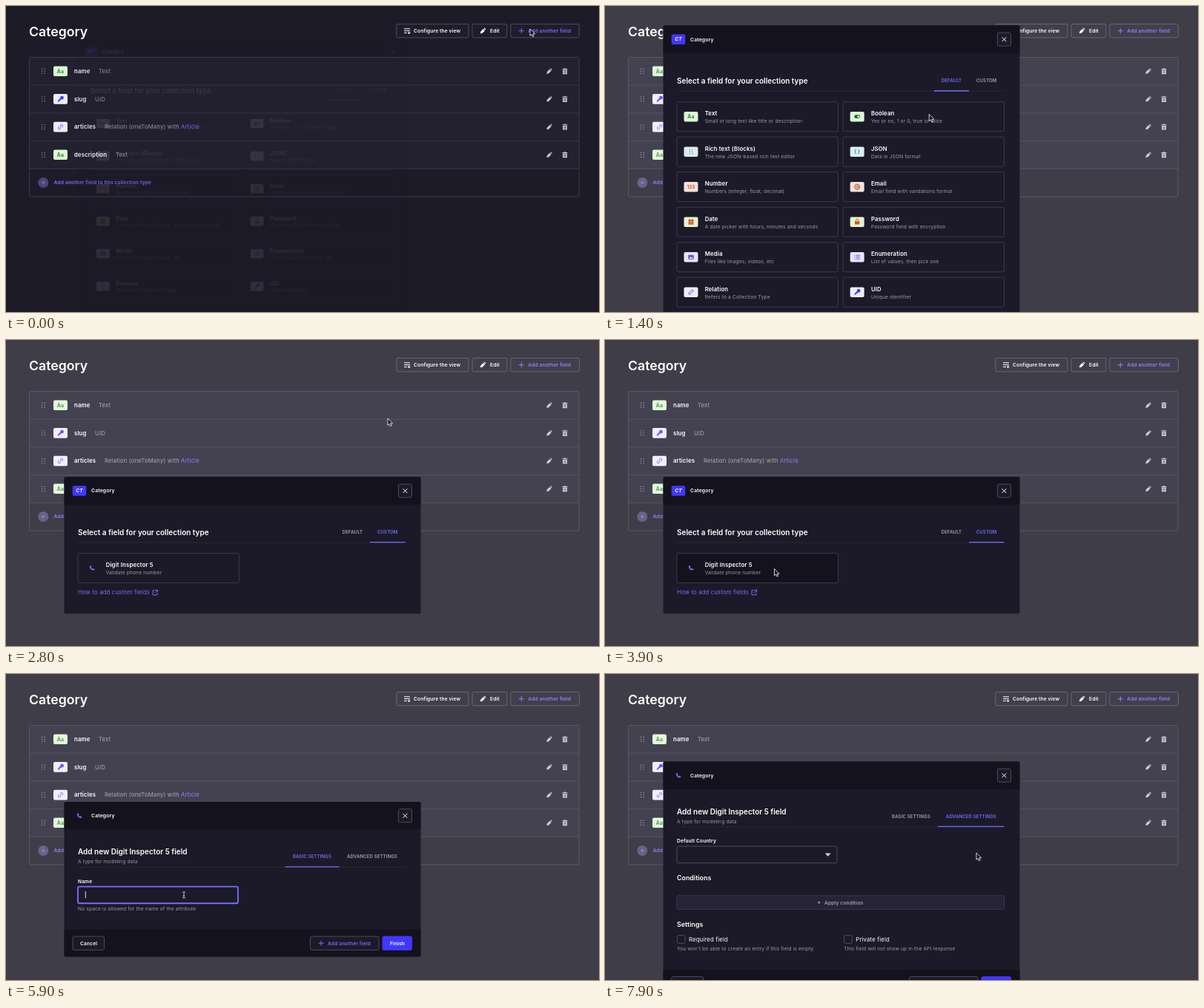
Animation, 800 px wide and 414 px high, one loop 8000 ms. Source, as an HTML page:

```html
<!DOCTYPE html>
<html lang="en">
<head>
<meta charset="utf-8">
<title>Add a custom field</title>
<style>
html, body { margin: 0; width: 100%; height: 100%; overflow: hidden; background: #1a1824; }
svg { display: block; width: 800px; height: 414px; }
text { font-family: Inter, sans-serif; white-space: pre; }
</style>
</head>
<body>
<svg id="stage" viewBox="0 0 800 414"></svg>
<script>
const WHITE = '#fff', GRAY = '#9b99a8', PURPLE = '#746eff', BLUE = '#4038ff';
const BODY = '#1c1a28', DARK = '#14121c', LINE = '#3b394d', EDGE = '#4b4963';
const PLUGIN = 'Digit Inspector';

// Text is placed by its left edge and the middle of its capitals.
const text = (x, y, s, size = 6.65, weight = 400, fill = GRAY, extra = '') =>
  `<text x="${x}" y="${y + size * 0.364}" font-size="${size}" font-weight="${weight}" fill="${fill}"
    letter-spacing="${size < 8.5 ? '.02em' : 0}" ${extra}>${s}</text>`;
const rect = (x, y, w, h, fill = 'none', stroke = 'none', r = 2, extra = '') =>
  `<rect x="${x}" y="${y}" width="${w}" height="${h}" rx="${r}" fill="${fill}" stroke="${stroke}" ${extra}/>`;
const path = (d, fill = 'none', stroke = 'none', width = 1) =>
  `<path d="${d}" fill="${fill}" stroke="${stroke}" stroke-width="${width}"/>`;
const at = (x, y, s) => `<g transform="translate(${x} ${y})">${s}</g>`;
const group = (id, s) => `<g id="${id}">${s}</g>`;
const hline = (x1, x2, y, stroke, width = 1) => path(`M${x1} ${y}H${x2}`, 'none', stroke, width);
const centred = 'text-anchor="middle"';

const plus = (color, r = 3.5) => path(`M${-r} 0H${r}M0 ${-r}V${r}`, 'none', color, 1);
const dots = (color, gap = 3, size = 1.2) => [-1, 0, 1].flatMap(row => [-1, 1].map(col =>
  rect(col * gap * 0.58 - size / 2, row * gap - size / 2, size, size, color, 'none', 0.4))).join('');
const pencil = color => path('M-3.7 3.7L-3.1 .9 .4-2.6 2.6-.4-.9 3.1ZM1-3.2L2-4 4-2 3.2-1Z', color);
const trash = color => path('M-3.5-3.3H-1.2V-4H1.2V-3.3H3.5V-2.3H-3.5ZM-3-1.7H3V4H-3ZM-1.3-.6V2.8H-.6V-.6ZM.6-.6V2.8H1.3V-.6Z',
  color).replace('<path', '<path fill-rule="evenodd"');
const phone = path('M-3.2-2.4L-1.7-3.4-.4-1.3-1.2-.5Q-.6.8.8 1.3L1.5.4 3.5 1.7 2.5 3.2Q-2.8 3.4-3.2-2.4Z', PURPLE);
const key = path('M-3.6 3.6V2L-.2-1.4A2.3 2.3 0 1 1 1.5.3L.3 1.4H-.7V2.5H-1.8V3.6Z', BLUE);
const link = path('M-.8.8L.8-.8M-.6-1.6L.9-3A1.6 1.6 0 0 1 3-.9L1.6.6M.6 1.6L-.9 3A1.6 1.6 0 0 1-3 .9L-1.6-.6', 'none', BLUE, 0.9);

const icons = {
  text: ['#dcf8d5', text(0, 0, 'Aa', 7, 600, '#2f7a2d', centred)],
  bool: ['#dcf8d5', rect(-4, -2.4, 8, 4.8, '#2f6b2e', 'none', 2.4) + '<circle cx="1.7" r="1.5" fill="#dcf8d5"/>'],
  blocks: ['#dcecee', dots('#5aa08c', 2.8, 1.4)],
  json: ['#d8eef3', text(0, -0.3, '{ }', 6.6, 600, '#2f7468', centred)],
  number: ['#f3e3dd', text(0, 0, '123', 6, 700, '#dc4a20', centred)],
  email: ['#f3e3dd', '<circle r="3.3" fill="none" stroke="#d9582a" stroke-width="1.3"/><circle r="1.3" fill="none" stroke="#d9582a"/>'
    + path('M1.5-1V1L3.3 1.2', 'none', '#d9582a')],
  date: ['#e4f3d3', rect(-3.4, -3, 6.8, 6.6, '#d0571f', 'none', 0.6) + path('M-2-4V-2M2-4V-2', 'none', '#7a4a1c')
    + path('M-2.5-.8H2.5M-1.5 1.5H1.5', 'none', '#f3d9b0', 0.7)],
  password: ['#e4f3d3', rect(-3.2, -1, 6.4, 4.4, '#d0571f', 'none', 0.6) + path('M-1.7-1V-2.2A1.7 1.7 0 0 1 1.7-2.2V-1', 'none', '#d0571f')],
  media: ['#e6e4ff', rect(-3.8, -3, 7.6, 6, '#5f5ad8', 'none', 0.6) + path('M-2.8 2L-.8-.4.6 1 1.6 0 2.8 2Z', '#e6e4ff')],
  list: ['#e6e4ff', path('M-3.8-2.4H-2.8M-3.8 0H-2.8M-3.8 2.4H-2.8M-1.8-2.4H3.8M-1.8 0H3.8M-1.8 2.4H3.8', 'none', '#5f5ad8')],
  relation: ['#eeedff', link],
  uid: ['#eeedff', key],
};
const badge = (x, y, kind) => at(x, y, rect(-9.5, -6.8, 19, 13.6, icons[kind][0]) + icons[kind][1]);

const button = (x, y, w, label, textX, color = WHITE, fill = BODY, stroke = EDGE) =>
  rect(x, y - 9.2, w, 18.4, fill, stroke) + text(textX, y, label, 6.65, 600, color);
const addButton = (x, y) => button(x, y, 92.5, 'Add another field', x + 23.5, PURPLE) + at(x + 14.5, y, plus(PURPLE));

function page() {
  const rows = [
    ['text', 'name', 'Text', 125], ['uid', 'slug', 'UID', 120],
    ['relation', 'articles', `Relation (oneToMany) with <tspan fill="${PURPLE}">Article</tspan>`, 133],
    ['text', 'description', 'Text', 148],
  ];
  return rect(0, 0, 800, 414, '#1a1824', 'none', 0)
    + text(31, 34.3, 'Category', 17.7, 600, WHITE)
    + button(526.8, 33.6, 97.2, 'Configure the view', 550)
    + path('M537 30.8H545M537 33.6H545M537 36.4H541M542 36.4H545.5M543.7 34.8V38', 'none', WHITE)
    + button(629, 33.6, 46.8, 'Edit', 653) + at(643.5, 33.6, pencil(WHITE))
    + addButton(680.8, 33.6)
    + rect(31.5, 69.5, 741.5, 151, '#201e2e')
    + rows.map(([kind, name, type, x], i) => {
      const y = 88.2 + i * 37.7;
      return at(50.3, y, dots('#a5a3b3')) + badge(73.5, y, kind)
        + text(92, y, name, 7.75, 600, WHITE) + text(x, y, type, 7.75)
        + at(733, y, pencil('#c4c2d0')) + at(754, y, trash('#c4c2d0'))
        + hline(31.5, 773, y + 19, '#343245');
    }).join('')
    + rect(31.5, 69.5, 741.5, 188.5, 'none', '#3a384c')
    + '<circle cx="50.3" cy="239" r="7" fill="#494670"/>' + at(50.3, 239, plus(PURPLE, 2.3))
    + text(64.5, 239, 'Add another field to this collection type', 6.65, 600, PURPLE);
}

// Dialog parts use y from the top of the dialog.
const frame = (height, icon) => rect(78.5, 0, 481, height, BODY) + rect(78.5, 0, 481, 37.5, DARK)
  + icon + text(115, 18.8, 'Category', 6.8, 600, WHITE)
  + rect(529.5, 9.8, 18, 18, BODY, EDGE) + path('M535.6 16L541.4 21.8M541.4 16L535.6 21.8', 'none', WHITE);
const tabs = (y, lineY, list, active) => hline(97, 538.5, lineY + 0.5, '#2c2a3b', 0.8)
  + list.map(([label, from, to], i) =>
    text((from + to) / 2, y, label, 6.05, 600, i === active ? PURPLE : '#a3a1b0', centred)
    + (i === active ? hline(from, to, lineY, PURPLE, 1.4) : '')).join('');
const card = (x, y, icon, title, note, extra = '') => rect(x, y, 217.3, 40, BODY, LINE, 2, extra) + icon
  + text(x + 37.7, y + 15.6, title, 7.75, 600, WHITE) + text(x + 37.7, y + 26, note);

const typeBadge = rect(89.7, 12, 18.6, 13.6, BLUE) + text(99, 18.8, 'CT', 6.6, 700, WHITE, centred + ' font-style="italic"');
const picker = (height, active) => frame(height, typeBadge)
  + text(97, 75, 'Select a field for your collection type', 9.97, 600, WHITE)
  + tabs(75, 88.4, [['DEFAULT', 444, 491], ['CUSTOM', 491, 538.5]], active);

function defaultDialog() {
  const cards = [
    ['text', 'Text', 'Small or long text like title or description'],
    ['bool', 'Boolean', 'Yes or no, 1 or 0, true or false'],
    ['blocks', 'Rich text (Blocks)', 'The new JSON-based rich text editor'],
    ['json', 'JSON', 'Data in JSON format'],
    ['number', 'Number', 'Numbers (integer, float, decimal)'],
    ['email', 'Email', 'Email field with validations format'],
    ['date', 'Date', 'A date picker with hours, minutes and seconds'],
    ['password', 'Password', 'Password field with encryption'],
    ['media', 'Media', 'Files like images, videos, etc'],
    ['list', 'Enumeration', 'List of values, then pick one'],
    ['relation', 'Relation', 'Refers to a Collection Type'],
    ['uid', 'UID', 'Unique identifier'],
  ];
  return picker(504, 0) + cards.map(([kind, title, note], i) => {
    const x = i % 2 ? 321.2 : 97, y = 103.4 + (i >> 1) * 47.5;
    return card(x, y, badge(x + 19, y + 20, kind), title, note);
  }).join('');
}

const customDialog = () => picker(185, 1)
  + card(97, 103.4, at(116, 123.2, phone), PLUGIN + ' 5', 'Validate phone number', 'id="customCard"')
  + text(97, 156.3, 'How to add custom fields', 7.75, 400, PURPLE)
  + path('M200.5 153.5H198V159.7H204V157M201.5 153H204.5V156M204.5 153L200.5 157', 'none', PURPLE);

const settings = (height, active) => frame(height, at(99, 18.8, phone))
  + text(97, 67.5, `Add new ${PLUGIN} 5 field`, 9.97, 600, WHITE)
  + text(97, 80.7, 'A type for modeling data')
  + tabs(74.2, 88, [['BASIC SETTINGS', 376.5, 449.5], ['ADVANCED SETTINGS', 449.5, 538.5]], active)
  + rect(78.5, height - 36.8, 481, 36.8, DARK)
  + button(90, height - 18.2, 42.5, 'Cancel', 100)
  + addButton(410.5, height - 18.2)
  + button(508, height - 18.2, 39.5, 'Finish', 518, WHITE, BLUE, BLUE);

const basicDialog = () => settings(209.5, 0)
  + text(97, 107.2, 'Name', 6.65, 600, WHITE)
  + rect(97, 114.7, 216, 22.6, BODY, PURPLE, 2, 'id="field"')
  + text(107, 125.8, '', 7.75, 400, WHITE, 'id="typed"')
  + rect(0, 121, 0.9, 9.5, WHITE, 'none', 0, 'id="caret"')
  + text(97, 144.5, 'No space is allowed for the name of the attribute')
  + group('popup', path('M164 140.5L167 137.5 170 140.5Z', '#1b1b1a') + rect(155, 140, 90, 48, '#1b1b1a', 'none', 3)
    + text(162, 155.2, 'phone', 7.2, 500, WHITE) + text(162, 176, PLUGIN, 7.2, 500, WHITE));

const check = (x, label, note) => rect(x + 0.3, 235.2, 10.8, 10.8, BODY, EDGE)
  + text(x + 16, 240.6, label, 7.75, 400, WHITE) + text(x, 253.6, note);
const advancedDialog = () => settings(318.5, 1)
  + text(97, 107.2, 'Default Country', 6.65, 600, WHITE)
  + rect(97, 114.7, 216, 22.6, BODY, EDGE) + path('M296.8 124H304.6L300.7 128.3Z', '#d5d4de')
  + text(97, 157.4, 'Conditions', 8.86, 600, WHITE)
  + rect(97, 181.5, 441.5, 18.4, '#252337', LINE)
  + at(288.6, 190.8, plus(GRAY, 1.9)) + text(296, 190.8, 'Apply condition', 6.65, 600, '#a3a1b0')
  + text(97, 220, 'Settings', 8.86, 600, WHITE)
  + check(97, 'Required field', "You won't be able to create an entry if this field is empty")
  + check(322.3, 'Private field', 'This field will not show up in the API response');

const scenes = [
  { id: 'default', from: 0, top: 26.3, draw: defaultDialog },
  { id: 'custom', from: 2600, top: 185.2, draw: customDialog },
  { id: 'basic', from: 4800, top: 172.9, draw: basicDialog },
  { id: 'advanced', from: 7600, top: 118.4, draw: advancedDialog },
];
const stage = document.getElementById('stage');
stage.innerHTML = page() + rect(0, 0, 800, 414, WHITE, 'none', 0, 'id="shade"')
  + group('dialog', scenes.map(s => group(s.id, at(0, s.top, s.draw()))).join(''))
  + group('arrow', path('M0 0V9.3L2.1 7.4 3.6 10.6 5.1 9.9 3.7 6.8H6.6Z', '#111', WHITE, 0.8))
  + group('beam', path('M-2-4.3Q0-4.3 0-3Q0-4.3 2-4.3M0-3V3M-2 4.3Q0 4.3 0 3Q0 4.3 2 4.3M-1.2 1H1.2', 'none', '#111', 2)
    + path('M-2-4.3Q0-4.3 0-3Q0-4.3 2-4.3M0-3V3M-2 4.3Q0 4.3 0 3Q0 4.3 2 4.3M-1.2 1H1.2', 'none', '#ddd', 0.9));

const el = id => document.getElementById(id);
const set = (id, attrs) => { for (const name in attrs) el(id).setAttribute(name, attrs[name]); };
const show = (id, on) => set(id, { display: on ? 'inline' : 'none' });
const smooth = x => { x = Math.min(1, Math.max(0, x)); return x * x * (3 - 2 * x); };

const pointer = [
  [0, 707, 31], [300, 413.5, 144], [900, 402, 152], [1500, 440, 146], [2300, 513, 103], [2500, 515.5, 105.5],
  [2800, 515, 106], [3500, 250, 333], [3900, 228.5, 309.5], [4300, 229, 309], [4800, 236, 298],
  [4900, 237, 297.5], [5600, 240, 299], [7000, 240, 299], [7400, 501, 242], [8000, 501, 242],
];
const keyTimes = [6200, 6300, 6500, 6600, 6700];

function pointerAt(t) {
  const i = pointer.findIndex(p => p[0] > t);
  const [t0, x0, y0] = pointer[i - 1], [t1, x1, y1] = pointer[i];
  const k = smooth((t - t0) / (t1 - t0));
  return [x0 + (x1 - x0) * k, y0 + (y1 - y0) * k];
}

function render(t) {
  const open = smooth((t + 35) / 200), scale = 0.92 + 0.08 * open;
  set('shade', { opacity: 0.16 * open });
  set('dialog', { opacity: open, transform: `translate(319 277.7) scale(${scale}) translate(-319 -277.7)` });
  const scene = scenes.filter(s => s.from <= t).pop();
  scenes.forEach(s => show(s.id, s === scene));
  set('customCard', { fill: t > 3700 ? DARK : BODY });

  const focused = t < 7400, ring = smooth((t - 4850) / 150);
  el('typed').textContent = 'phone'.slice(0, keyTimes.filter(k => k <= t).length);
  set('field', { stroke: focused ? (t < 4950 ? '#5752b8' : PURPLE) : EDGE, 'stroke-width': focused ? 1 + 0.9 * ring : 1 });
  if (scene.id === 'basic') set('caret', { x: 106.8 + el('typed').getComputedTextLength() });
  show('caret', focused && (t >= 6200 || Math.floor((t - 4800) / 500) % 2 === 0));
  show('popup', t >= 6200 && focused);

  const [x, y] = pointerAt(t);
  const visible = t < 6200 || t >= 7050;
  const overField = scene.id === 'basic' && x > 97 && x < 313 && y > 287 && y < 310;
  show('arrow', visible && !overField);
  show('beam', visible && overField);
  set('arrow', { transform: `translate(${x} ${y})` });
  set('beam', { transform: `translate(${x} ${y})` });
}

function tick() {
  render(performance.now() % 8000);
  requestAnimationFrame(tick);
}
tick();
</script>
</body>
</html>
```
